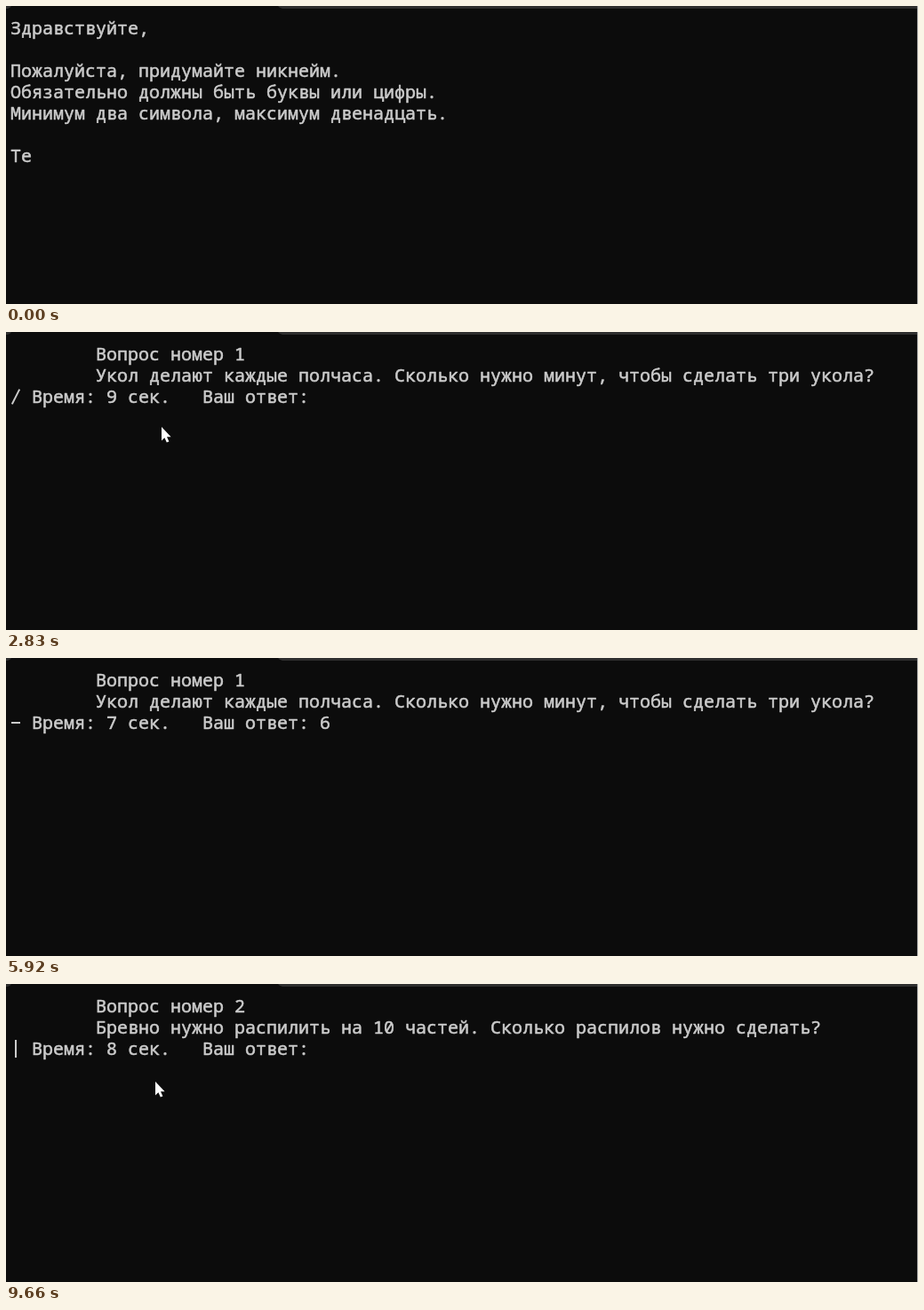
An HTML page with a canvas that plays this animation: 1026 px wide and 336 px high, repeating every 9680 ms.

```html
<!DOCTYPE html>
<html lang="ru">
<head>
<meta charset="utf-8">
<title>Викторина</title>
<style>
  html, body { margin: 0; width: 100%; height: 100%; overflow: hidden; background: #0c0c0c; }
  canvas { display: block; }
</style>
</head>
<body>
<canvas id="stage" width="1026" height="336"></canvas>
<script>
const ctx = document.getElementById('stage').getContext('2d');
const LOOP = 9680, CELL = 12, ROW = 24, LEFT = 5, BASE = 32;
const INK = '#cccccc', BG = '#0c0c0c', BAR = '#2e2e2e';

const intro = [
  'Здравствуйте,', '',
  'Пожалуйста, придумайте никнейм.',
  'Обязательно должны быть буквы или цифры.',
  'Минимум два символа, максимум двенадцать.'
];
const nick = 'Тестер';
const keyTimes = [270, 550, 1010, 1130];

const QUIZ_START = 1690, TICK = 133.5, QUIZ_TICKS = 38, ANSWER_TICK = 29;
const questions = [
  'Укол делают каждые полчаса. Сколько нужно минут, чтобы сделать три укола?',
  'Бревно нужно распилить на 10 частей. Сколько распилов нужно сделать?'
];

// Pointer stops for each question
const trips = [
  [{ at: 7, x: 170, y: 172 }, { at: 11, x: 180, y: 41 }, { at: 15, x: 154, y: 110 }, { at: 24, x: 198, y: 130 }],
  [{ at: 44, x: 222, y: 109 }, { at: 51, x: 198, y: 90 }, { at: 56, x: 168, y: 110 }]
];

// A thin outline gives the letters the heavier terminal weight
function print(text, col, row) {
  const x = LEFT + col * CELL, y = BASE + row * ROW;
  ctx.lineWidth = 0.55;
  ctx.strokeText(text, x, y);
  ctx.fillText(text, x, y);
}

function drawWindow() {
  ctx.fillStyle = BAR;
  ctx.fillRect(0, 0, 1026, 3);
  ctx.fillStyle = BG;
  ctx.fillRect(0, 3, 1026, 333);
  ctx.beginPath();
  ctx.moveTo(2, 3);
  ctx.quadraticCurveTo(5, 2, 6, 0);
  ctx.lineTo(306, 0);
  ctx.quadraticCurveTo(307, 2, 311, 3);
  ctx.fill();
  ctx.fillStyle = '#a8a8a8';
  ctx.fillRect(1025, 0, 1, 336);
}

function drawIntro(t) {
  intro.forEach((line, row) => print(line, 0, row));
  const count = 2 + keyTimes.filter(k => t >= k).length;
  print(nick.slice(0, count), 0, 6);
  if (t >= 120) ctx.fillRect(LEFT + count * CELL, 157, 1, ROW);
}

// The stroke turns through | / - \ inside a rounded box
function drawSpinner(n) {
  const phase = (3 * n + 3 - (n >= 8)) % 4;
  const bulge = v => Math.abs(v) < 1e-6 ? 0 : Math.sign(v) * Math.sqrt(Math.abs(v));
  const dx = 5 * bulge(Math.sin(phase * Math.PI / 4));
  const dy = 10 * bulge(Math.cos(phase * Math.PI / 4));
  ctx.lineWidth = 2;
  ctx.beginPath();
  ctx.moveTo(11 - dx, 73 + dy);
  ctx.lineTo(11 + dx, 73 - dy);
  ctx.stroke();
}

function drawQuiz(tick) {
  const q = tick < QUIZ_TICKS ? 0 : 1;
  const n = tick - q * QUIZ_TICKS;
  const passed = Math.floor(n / 8.5);
  print('Вопрос номер ' + (q + 1), 8, 0);
  print(questions[q], 8, 1);
  drawSpinner(n);
  if (passed > 0) print(`Время: ${10 - passed} сек.`, 2, 2);
  print('Ваш ответ:', 18, 2);
  const typed = Math.floor((n - ANSWER_TICK) / 5) + 1;
  print('60'.slice(0, Math.max(0, typed)), 29, 2);
  if (typed <= 0) drawPointer(tick, trips[q]);
}

function drawPointer(tick, stops) {
  const i = stops.findLastIndex(s => s.at <= tick);
  if (i < 0) return;
  const a = stops[i], b = stops[i + 1] || a;
  const f = a === b ? 0 : (tick - a.at) / (b.at - a.at);
  const ease = f * f * (3 - 2 * f);
  ctx.save();
  ctx.translate(Math.round(a.x + (b.x - a.x) * ease), Math.round(a.y + (b.y - a.y) * ease));
  ctx.fillStyle = '#ffffff';
  ctx.fill(new Path2D('M0 0V15.5L3.4 12.2 5.8 17.6 8.4 16.4 6 11.2H10.6Z'));
  ctx.restore();
}

function frame() {
  const t = performance.now() % LOOP;
  drawWindow();
  ctx.font = '500 20px "Noto Sans Mono", "DejaVu Sans Mono", monospace';
  ctx.fillStyle = ctx.strokeStyle = INK;
  ctx.lineJoin = 'round';
  if (t < QUIZ_START) drawIntro(t);
  else drawQuiz(t < 1810 ? 0 : Math.floor((t - 1620) / TICK));
  requestAnimationFrame(frame);
}
frame();
</script>
</body>
</html>
```
